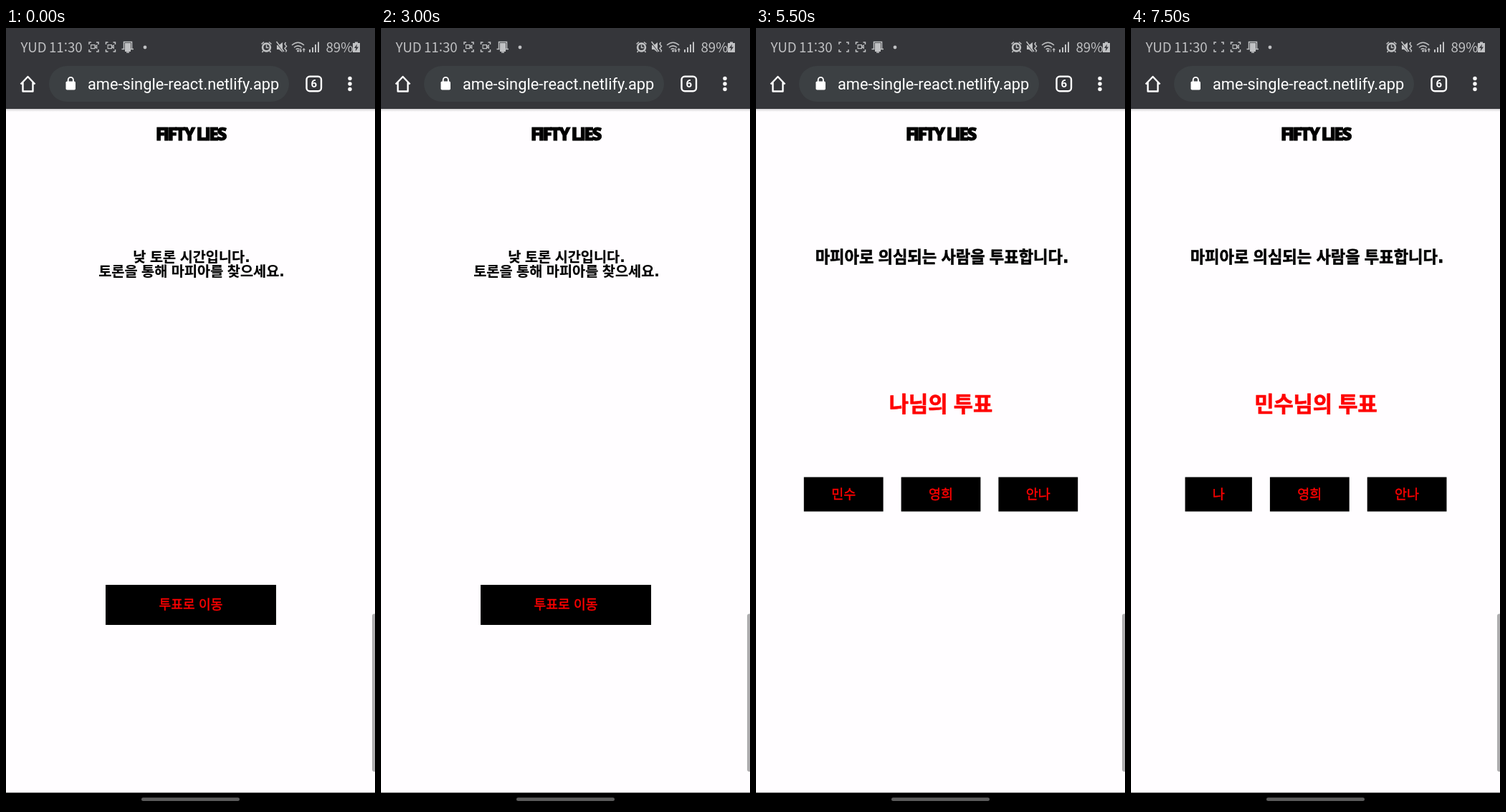
Recreate the animation shown at these times as an HTML page. Size 515 by 1087 pixels, loop 8 s.

```html
<!DOCTYPE html>
<html lang="ko">
<head>
<meta charset="utf-8">
<title>Vote game</title>
<style>
  html, body { margin: 0; width: 100%; height: 100%; overflow: hidden; background: #fffdff; }
  svg { display: block; width: 515px; height: 1087px; }
  text { font-family: "Noto Sans CJK KR", "Noto Sans CJK", sans-serif; }
  .ui { font-family: Roboto, sans-serif; }
  .status { font-size: 18.7px; fill: #c0c1c3; }
  .mid { text-anchor: middle; }
  .title { font: 800 24px "Open Sans", "Noto Sans", sans-serif;
    letter-spacing: -2.3px; stroke: #000; stroke-width: .9px; }
  .talk { font-size: 19.7px; font-weight: 700; stroke: #000; stroke-width: .2px; }
  .ask { font-size: 22.2px; font-weight: 700; stroke: #000; stroke-width: .6px; }
  .turn { font-size: 29.6px; font-weight: 700; fill: #f00; stroke: #f00; stroke-width: .7px; }
  .btn { font-size: 18.5px; font-weight: 500; fill: #f00; stroke: #f00; stroke-width: .45px; }
  .dot { font-family: "DejaVu Sans", sans-serif; font-weight: 700; }
  .line { fill: none; stroke: #c0c1c3; stroke-width: 1.5; }
  .fill { fill: #c0c1c3; }
  .white { fill: none; stroke: #fff; stroke-width: 2.4; }
</style>
</head>
<body>
<svg viewBox="0 0 515 1087">
  <defs>
    <linearGradient id="shade" x2="0" y2="1">
      <stop stop-color="#c9c8ca"/><stop offset="1" stop-color="#fffdff"/>
    </linearGradient>
    <path id="corners" class="line" d="M116 23v-3h3M126 20h3v3M129 30v3h-3M119 33h-3v-3"/>
    <path id="cam" class="line" style="stroke-width:1.1" d="M118.6 23.6h5.4v5h-5.4zM124 26l2.8-2v4.4z"/>
  </defs>

  <rect width="515" height="1087" fill="#fffdff"/>
  <rect y="112" width="515" height="5" fill="url(#shade)"/>
  <rect width="515" height="113" fill="#35363a"/>

  <!-- status bar -->
  <g class="ui status">
    <text x="20.5" y="33.5">YUD</text>
    <text x="60" y="33.5">11:30</text>
    <text x="446.5" y="33.5">89%</text>
  </g>
  <use href="#corners"/>
  <use id="rec" href="#cam"/>
  <use href="#corners" x="23.5"/>
  <use href="#cam" x="23.5"/>
  <path class="fill" d="M166 21h8v12h-8z"/>
  <path class="line" d="M164.500 29.500v-10h11v10M161.500 29.500h4M174 29.500h4M168 34h4"/>
  <circle class="fill" cx="194" cy="27" r="2.4"/>

  <circle class="line" cx="363.5" cy="27" r="5.4" style="stroke-width:2.6"/>
  <path class="line" d="M363.500 23.500v4h3M356.500 22.500l3.500-3M370.500 22.500l-3.500-3M359 32l-1.500 2M368 32l1.500 2"/>
  <path class="fill" d="M378 24h3l5-4v14l-5-4h-3z"/>
  <path d="M377.500 20.500l10 13" stroke="#35363a" stroke-width="1.5"/>
  <path class="line" d="M377.500 19l10.500 14M390.500 20l-1.500 2.500 2.500 3-2.500 3 2.500 3-1 2"/>
  <path class="line" d="M399 24q8.500-7.500 17 0M402 27.300q5.500-4.800 11 0M404.700 30q2.800-2.500 5 0"/>
  <circle class="fill" cx="407.5" cy="32" r="1.5"/>
  <path id="down" class="fill" d="M410.500 28.500h1.400v3h1.600l-2.300 2.600-2.300-2.600h1.600z"/>
  <path class="fill" d="M415 33.500h1.400v-3h1.600l-2.300-2.600-2.300 2.600h1.600z"/>
  <path class="fill" d="M423 30h2v4h-2zM427 27h2v7h-2zM431 23h2v11h-2zM435 19.500h2v14.500h-2z"/>
  <path class="fill" d="M487 19.500h4v1.500h3v13h-10v-13h3z"/>
  <path fill="#35363a" d="M490 22.500l-4 5.500h2.500l-.8 4.500 4.300-6h-2.800z"/>

  <!-- address bar -->
  <path class="white" d="M20.500 78.500l10-10.500 10 10.500M23.500 76v12.500h14v-12.500" stroke-linejoin="round"/>
  <rect x="60" y="53" width="335" height="50" rx="25" fill="#3c4043"/>
  <rect x="83.5" y="74.5" width="13.5" height="12" rx="1.8" fill="#fff"/>
  <path class="white" d="M86.700 75v-2.500a3.600 3.600 0 0 1 7.200 0v2.500" style="stroke-width:1.9"/>
  <text class="ui" x="114" y="86" font-size="21.8" fill="#fff">ame-single-react.netlify.app</text>
  <rect class="white" x="419.5" y="67.7" width="20.5" height="20.5" rx="4.5"/>
  <text class="ui mid" x="429.8" y="83.2" font-size="15" font-weight="700" fill="#fff">6</text>
  <g fill="#fff">
    <circle cx="480" cy="70.5" r="2.7"/><circle cx="480" cy="78" r="2.7"/><circle cx="480" cy="85.5" r="2.7"/>
  </g>

  <!-- page -->
  <text class="title mid" x="257.5" y="156.5">FIFTY LIES</text>
  <g id="talk">
    <text class="talk mid" x="259" y="326.5">낮 토론 시간입니다<tspan class="dot">.</tspan></text>
    <text class="talk mid" x="259" y="346.5">토론을 통해 마피아를 찾으세요<tspan class="dot">.</tspan></text>
    <rect x="139" y="778" width="238" height="56"/>
    <text class="btn mid" x="258" y="812" style="font-size:18.2px">투표로 이동</text>
  </g>
  <g id="ask"><text class="ask mid" x="259.5" y="328">마피아로 의심되는 사람을 투표합니다<tspan class="dot">.</tspan></text></g>
  <g id="vote1"></g>
  <g id="vote2"></g>

  <path d="M515 818.500h-1a3 3 0 0 0-3 3v214.500a3 3 0 0 0 3 3h1z" fill="#aeadaf"/>
  <rect y="1068.4" width="515" height="19"/>
  <rect x="189" y="1075.3" width="137" height="4.7" rx="2.3" fill="#5c5c5c"/>
</svg>
<script>
  const LOOP = 8000;
  const $ = id => document.getElementById(id);

  function add(parent, tag, attrs, label = '') {
    const el = document.createElementNS('http://www.w3.org/2000/svg', tag);
    for (const key in attrs) el.setAttribute(key, attrs[key]);
    el.textContent = label;
    parent.append(el);
  }

  // One voting round: heading and a centred row of buttons
  function ballot(group, voter, names) {
    const gap = 25, letter = 17.4;
    const widths = names.map(n => 76 + n.length * letter);
    const total = widths.reduce((a, b) => a + b, gap * (names.length - 1));
    let x = 258 - total / 2;
    add(group, 'text', { class: 'turn mid', x: 258, y: 535.5 }, voter + '님의 투표');
    names.forEach((name, i) => {
      add(group, 'rect', { x, y: 627.5, width: widths[i], height: 48 });
      add(group, 'text', { class: 'btn mid', x: x + widths[i] / 2, y: 658 }, name);
      x += widths[i] + gap;
    });
  }

  // Steps are [ms, opacity] pairs, held until the next one
  function hold(el, steps, duration = LOOP) {
    const frames = [...steps, [duration, steps.at(-1)[1]]].map(([ms, opacity]) =>
      ({ offset: ms / duration, opacity, easing: 'steps(1, end)' }));
    el.animate(frames, { duration, iterations: Infinity }).startTime = 0;
  }

  ballot($('vote1'), '나', ['민수', '영희', '안나']);
  ballot($('vote2'), '민수', ['나', '영희', '안나']);

  hold($('rec'), [[0, 1], [500, 0]], 1000);
  hold($('down'), [[0, 1], [400, .4], [600, 1], [1500, .4], [1600, 1], [3700, .4], [6800, 1]]);
  hold($('talk'), [[0, 1], [3300, 0]]);
  hold($('ask'), [[0, 0], [3300, 1]]);
  hold($('vote1'), [[0, 0], [3300, 1], [6000, 0]]);
  hold($('vote2'), [[0, 0], [6000, 1]]);
</script>
</body>
</html>
```
